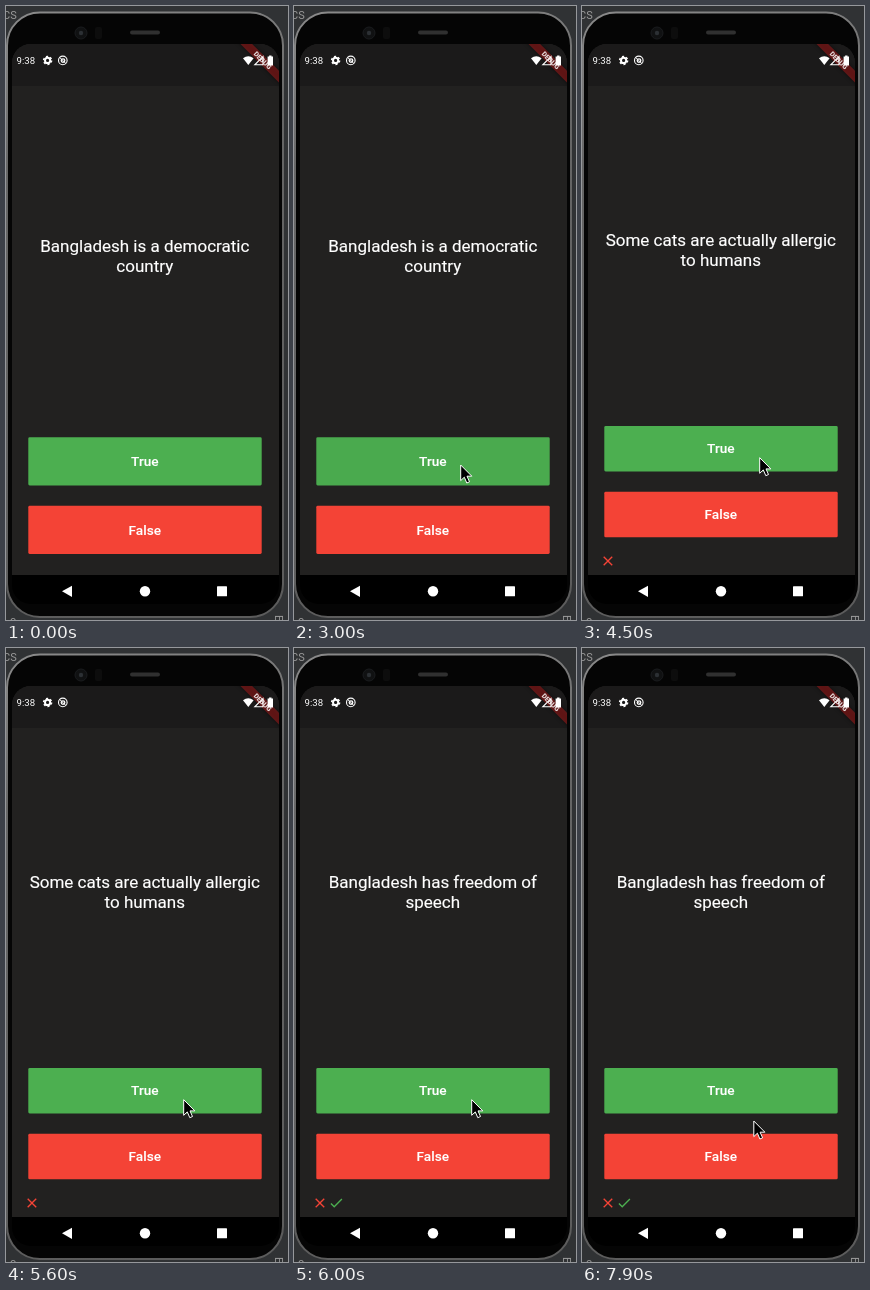
Write an HTML page that moves like this. It is 282 px wide and 614 px high and loops after 8 s.

```html
<!DOCTYPE html>
<html lang="en">
<head>
<meta charset="utf-8">
<title>True or false quiz</title>
<style>
  html, body { margin: 0; width: 100%; height: 100%; overflow: hidden; background: #303234; }
  svg { display: block; width: 282px; height: 614px; }
  text { font-family: Roboto, Arial, sans-serif; fill: #fff; }
  .question { font-size: 17px; text-anchor: middle; stroke: #fff; stroke-width: .2; }
  .label { font-size: 13.6px; font-weight: 500; text-anchor: middle; stroke: #fff; stroke-width: .15; }
  .desk { font-size: 11px; fill: #999; }
</style>
</head>
<body>
<svg viewBox="0 0 282 614" xmlns="http://www.w3.org/2000/svg">
  <defs>
    <clipPath id="screenClip"><rect x="6" y="38" width="267" height="560" rx="19"/></clipPath>
    <clipPath id="trueClip"><rect id="trueClipBox" x="22.3" width="233.4" rx="1.4"/></clipPath>
    <filter id="soft" x="-30%" y="-100%" width="160%" height="300%"><feGaussianBlur stdDeviation="2"/></filter>
    <linearGradient id="rim" gradientUnits="userSpaceOnUse" x1="0" y1="0" x2="140" y2="614">
      <stop offset="0" stop-color="#8c8c8c"/>
      <stop offset=".25" stop-color="#666"/>
      <stop offset="1" stop-color="#5c5c5c"/>
    </linearGradient>
  </defs>

  <!-- desktop and phone body -->
  <rect width="282" height="614" fill="#303234"/>
  <text class="desk" x="-3" y="13">CS</text>
  <text class="desk" x="1" y="618" font-size="9">.o</text>
  <text class="desk" transform="translate(269 609) rotate(90)">E</text>
  <rect x="1" y="6.5" width="276" height="604.5" rx="33" fill="#050505" stroke="url(#rim)" stroke-width="2"/>
  <rect x="124" y="24.5" width="30" height="4" rx="2" fill="#303030"/>
  <circle cx="75" cy="27" r="6" fill="#101112" stroke="#1a1c1e"/>
  <circle cx="75" cy="27" r="2.2" fill="#2c3034"/>
  <rect x="89" y="21" width="7" height="12" rx="2" fill="#0d0d0d"/>

  <g clip-path="url(#screenClip)">
    <rect x="6" y="38" width="267" height="531" fill="#222120"/>
    <rect x="6" y="38" width="267" height="42" fill="#1b1a1a"/>
    <rect x="6" y="569" width="267" height="30" fill="#000"/>
    <g transform="translate(273 38) rotate(45)">
      <rect x="-38" y="19" width="76" height="8.2" fill="#000" opacity=".5" filter="url(#soft)"/>
      <rect x="-38" y="19" width="76" height="8.2" fill="#b71c1c" opacity=".48"/>
      <text y="25.5" font-size="6.9" font-weight="900" text-anchor="middle" opacity=".85">DEBUG</text>
    </g>
  </g>

  <!-- status bar -->
  <text x="10.6" y="58.3" font-size="9.6">9:38</text>
  <g fill="none" stroke="#fff">
    <circle cx="41.6" cy="54.4" r="2.6" stroke-width="2"/>
    <circle cx="41.6" cy="54.4" r="4" stroke-width="1.5" stroke-dasharray="2.1 2.09"/>
    <circle cx="56.8" cy="54.4" r="4.3" stroke-width="1.1"/>
    <circle cx="57" cy="54.6" r="1.8" stroke-width="1.3"/>
    <path d="M53.6 51.4l6.4 6.2" stroke-width="1"/>
    <path d="M257 50.5v8.3h-8.2z" stroke-width="1.1"/>
  </g>
  <path d="M237 52.3q5.3-4 10.6 0L242.3 59z" fill="#fff"/>
  <path d="M261.6 50.6h1.5v-1.2h2.4v1.2h1.5v8.9h-5.4z" fill="#fff"/>

  <!-- navigation bar -->
  <path d="M56 585.3l10-5.6v11.2z" fill="#fff"/>
  <circle cx="139" cy="585.3" r="5.2" fill="#fff"/>
  <rect x="211" y="580.3" width="10" height="10" rx=".6" fill="#fff"/>

  <!-- quiz -->
  <text class="question" id="line0" x="138.8"></text>
  <text class="question" id="line1" x="138.8"></text>
  <rect id="trueBox" x="22.3" width="233.4" rx="1.4" fill="#4caf50"/>
  <g clip-path="url(#trueClip)">
    <rect id="tint" x="22" y="418" width="234" height="64"/>
    <circle id="ripple"/>
  </g>
  <text class="label" id="trueLabel" x="138.8">True</text>
  <rect id="falseBox" x="22.3" width="233.4" rx="1.4" fill="#f44336"/>
  <text class="label" id="falseLabel" x="138.8">False</text>
  <path id="cross" transform="translate(17.8 546.8) scale(.68)" fill="#f44336"
    d="M19 6.41L17.59 5 12 10.59 6.41 5 5 6.41 10.59 12 5 17.59 6.41 19 12 13.41 17.59 19 19 17.59 13.41 12z"/>
  <path id="check" transform="translate(34.1 546.8) scale(.68)" fill="#4caf50"
    d="M9 16.17L4.83 12l-1.42 1.41L9 19 21 7l-1.41-1.41z"/>
  <path id="cursor" d="M0 0V15.6L3.6 12.2 6.1 18 8.8 16.8 6.3 11.2H11.1Z"
    fill="#000" stroke="#fff" stroke-width="1" stroke-linejoin="round"/>
</svg>
<script>
  const LOOP = 8000, STEP = 100;
  const $ = id => document.getElementById(id);
  const set = (id, attrs) => {
    for (const name in attrs) $(id).setAttribute(name, attrs[name]);
  };
  const show = (id, on) => set(id, { visibility: on ? "visible" : "hidden" });

  const questions = [
    { at: 0, lines: ["Bangladesh is a democratic", "country"] },
    { at: 3100, lines: ["Some cats are actually allergic", "to humans"] },
    { at: 5800, lines: ["Bangladesh has freedom of", "speech"] }
  ];
  const presses = [{ at: 2900, x: 167.5, y: 448 }, { at: 5600, x: 177, y: 446 }];
  // Time, x and y of the pointer tip
  const moves = [
    [600, 244, 453.5], [900, 166.7, 459],
    [4400, 166.7, 459], [4500, 177.7, 451.7],
    [7700, 177.7, 451.7], [7900, 171.8, 473]
  ];

  function pointerAt(t) {
    let i = 0;
    while (i < moves.length - 1 && moves[i + 1][0] <= t) i++;
    const [t0, x0, y0] = moves[i];
    const [t1, x1, y1] = moves[i + 1] || [t0 + 1, x0, y0];
    const p = Math.min(1, (t - t0) / (t1 - t0));
    const eased = 1 - (1 - p) ** 2;
    return [x0 + (x1 - x0) * eased, y0 + (y1 - y0) * eased];
  }

  function placeButton(name, y, height) {
    set(name + "Box", { y, height });
    set(name + "Label", { y: y + height / 2 + 4.7 });
  }

  function drawPress(t) {
    const press = presses.find(p => t >= p.at && t < p.at + 400);
    const age = press ? t - press.at : 0;
    const spreading = age >= 200;
    set("tint", { opacity: press && !spreading ? age * 0.0003 : 0 });
    set("ripple", {
      cx: press ? press.x : 0,
      cy: press ? press.y : 0,
      r: spreading ? 66 + (age - 200) * 0.28 : 0,
      opacity: spreading ? 0.075 * (400 - age) / 200 : 0
    });
  }

  function draw(time) {
    const t = Math.floor((time % LOOP) / STEP) * STEP;
    const index = questions.filter(q => q.at <= t).length - 1;
    const answered = index > 0;

    questions[index].lines.forEach((line, i) => {
      $("line" + i).textContent = line;
      set("line" + i, { y: (answered ? 240.3 : 246.3) + i * 20 });
    });
    const height = answered ? 45.5 : 48.2;
    const top = answered ? 420 : 431.3;
    placeButton("true", top, height);
    placeButton("false", answered ? 485.8 : 499.8, height);
    set("trueClipBox", { y: top, height });
    show("cross", answered);
    show("check", index > 1);
    drawPress(t);

    show("cursor", t >= moves[0][0]);
    set("cursor", { transform: `translate(${pointerAt(t)})` });
  }

  const start = performance.now();
  function tick() {
    draw(performance.now() - start);
    requestAnimationFrame(tick);
  }
  tick();
</script>
</body>
</html>
```
